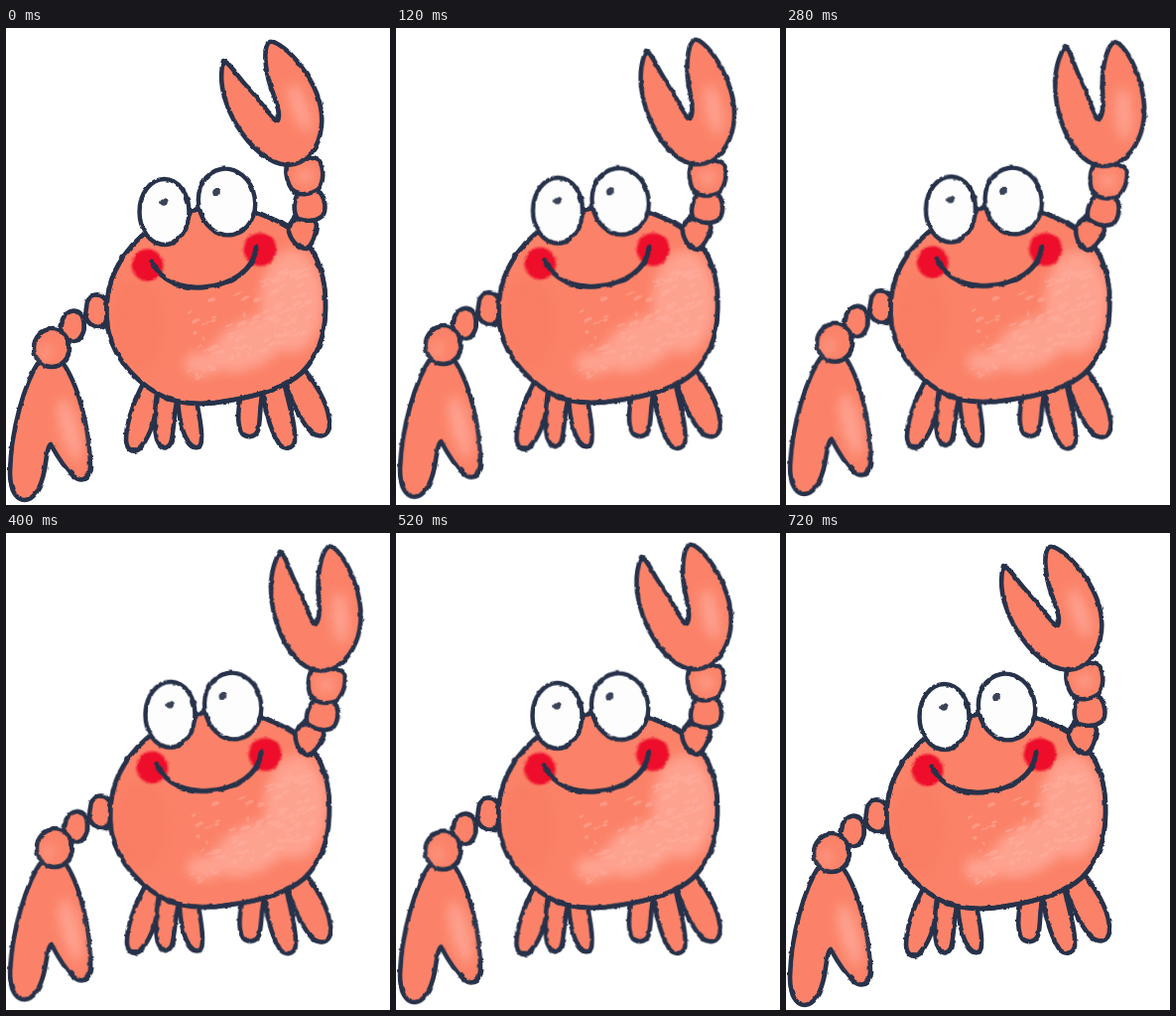
An HTML page for the animation above (760 ms loop, 387x480 px).

```html
<!DOCTYPE html>
<html lang="en">
<head>
<meta charset="utf-8">
<title>Waving crab</title>
<style>
  html, body { margin: 0; height: 100%; overflow: hidden; background: #fff; }
  svg { display: block; width: 100vw; height: 100vh; }
  .shell { fill: #fb8268; stroke: #27324a; stroke-width: 4.6; stroke-linejoin: round; }
  .line { fill: none; stroke: #27324a; stroke-width: 5; stroke-linecap: round; }
  .eye { fill: #fdfdfe; stroke: #27324a; stroke-width: 4.4; }
  .ink { fill: #27324a; }
  .pupil { fill: #3a4358; }
  .cheek { fill: #ee0c2c; filter: url(#smudge); }
  .light { fill: #ffb0a2; }
  .dark { fill: #f87c62; }
  .wash { filter: url(#soft); opacity: .7; }
</style>
</head>
<body>
<svg viewBox="0 0 387 480">
  <defs>
    <filter id="soft" x="-50%" y="-50%" width="200%" height="200%"><feGaussianBlur stdDeviation="6"/></filter>
    <filter id="smudge" x="-30%" y="-30%" width="160%" height="160%"><feGaussianBlur stdDeviation="1.3"/></filter>
    <filter id="wobble" filterUnits="userSpaceOnUse" x="-10" y="-10" width="410" height="500" color-interpolation-filters="sRGB">
      <feTurbulence type="fractalNoise" baseFrequency=".12" numOctaves="2" seed="3"/>
      <feDisplacementMap in="SourceGraphic" scale="3" xChannelSelector="R" yChannelSelector="G"/>
    </filter>
    <path id="shape" d="M190 183 C160 186 128 212 114 237 C102 257 98 284 104 308 C110 334 135 361 163 373 C185 380 205 379 224 375 C250 371 280 363 298 347 C316 329 322 307 322 282 C323 252 314 226 298 211 C285 198 265 190 248 184 C228 178 206 181 190 183Z"/>
    <clipPath id="inside"><use href="#shape"/></clipPath>
  </defs>

  <g id="crab"><g filter="url(#wobble)">
    <g class="shell">
      <path d="M138 358 C127 380 121 398 121 415 C122 427 130 428 136 422 C147 408 152 388 153 366"/>
      <path d="M152 368 C149 390 149 402 152 414 C156 424 162 425 166 418 C170 406 168 391 173 372"/>
      <path d="M173 372 C174 394 178 409 185 418 C190 424 197 424 197 414 C198 402 194 389 192 374"/>
      <path d="M237 368 C233 388 233 401 238 408 C243 413 251 412 254 405 C257 394 255 382 259 364"/>
      <path d="M258 362 C261 387 267 405 275 418 C280 425 289 424 291 416 C292 399 285 378 280 356"/>
      <path d="M280 354 C289 379 298 397 308 407 C315 413 325 411 326 401 C327 382 314 360 298 340"/>
    </g>

    <g class="shell">
      <path d="M34 334 C18 358 5 405 4 447 C4 465 10 475 19 475 C30 474 36 459 39 444 C41 430 42 421 45 419 C50 428 58 442 68 451 C76 458 84 454 85 442 C85 416 77 366 58 338Z"/>
      <path d="M57 293 C62 283 72 282 77 290 C80 299 79 308 73 314 C66 317 58 312 55 304Z"/>
      <path d="M82 275 C87 266 97 266 102 276 C103 286 102 295 98 300 C90 303 81 298 80 288Z"/>
      <ellipse cx="46" cy="322" rx="18" ry="19"/>
    </g>
    <g class="light wash">
      <ellipse cx="64" cy="404" rx="9" ry="32" transform="rotate(-15 64 404)"/>
      <ellipse cx="40" cy="326" rx="5" ry="7"/>
    </g>

    <use href="#shape" class="shell"/>
    <g clip-path="url(#inside)">
      <g class="wash">
        <ellipse class="dark" cx="132" cy="298" rx="26" ry="45"/>
        <ellipse class="light" cx="288" cy="275" rx="32" ry="52"/>
        <ellipse class="light" cx="245" cy="318" rx="42" ry="24" transform="rotate(-25 245 318)"/>
        <ellipse class="light" cx="197" cy="338" rx="18" ry="12"/>
      </g>
      <g id="flecks" class="light" opacity=".5"></g>
    </g>
    <use href="#shape" class="shell" style="fill:none"/>

    <circle class="cheek" cx="142.500" cy="238.500" r="16"/>
    <circle class="cheek" cx="256" cy="223" r="16.500"/>
    <path class="line" d="M147 235 C157 257 180 262 198 261 C228 259 250 243 252 221"/>

    <ellipse class="eye" cx="159.500" cy="185" rx="25" ry="33"/>
    <ellipse class="eye" cx="222.500" cy="175" rx="28.500" ry="33.500" transform="rotate(-10 222.500 175)"/>
    <circle class="pupil" cx="159" cy="175" r="3.800"/>
    <circle class="pupil" cx="212" cy="165.500" r="3.800"/>
  </g>

    <g id="arm"><g filter="url(#wobble)">
      <g class="shell">
        <path d="M285 205 C286 195 291 188 298 188 C305 189 311 192 313 198 C312 209 309 218 303 222 C296 222 288 216 285 205Z"/>
        <path d="M294 167 C301 163 312 162 317 166 C322 173 323 183 319 189 C312 195 302 195 294 192 C289 185 290 174 294 167Z"/>
        <path d="M283 138 C291 130 308 128 316 134 C321 142 320 155 315 162 C307 168 295 169 289 164 C284 157 281 147 283 138Z"/>
        <path d="M219 33 C214 53 220 76 232 97 C246 120 265 137 284 138 C303 137 316 121 318 98 C320 76 310 55 297 38 C286 23 271 12 265 14 C259 20 261 42 267 60 C273 75 277 87 274 93 C268 92 257 74 245 61 C234 50 225 34 219 33Z"/>
      </g>
      <g class="light wash" opacity=".6">
        <ellipse cx="296" cy="80" rx="8" ry="26" transform="rotate(-20 296 80)"/>
        <ellipse cx="301" cy="149" rx="8" ry="7"/>
      </g>
    </g></g>
  </g>
</svg>
<script>
  const FRAME = 40, LOOP = 760;
  // Wave amount: [step, amount], with one padding key at each end
  const keys = [[-1, -.2], [0, 0], [3, .54], [7, 1], [8.2, 1.08], [10, .92],
                [12, .6], [15, .227], [18, 0], [19, 0]];
  const crab = document.getElementById('crab');
  const arm = document.getElementById('arm');
  const flecks = document.getElementById('flecks');

  const slope = i => (keys[i + 1][1] - keys[i - 1][1]) / (keys[i + 1][0] - keys[i - 1][0]);

  function waveAt(step) {
    if (step >= 18) return 0;
    let i = 1;
    while (keys[i + 1][0] <= step) i++;
    const [x0, y0] = keys[i], [x1, y1] = keys[i + 1];
    const w = x1 - x0, u = (step - x0) / w, v = 1 - u;
    return v * v * ((1 + 2 * u) * y0 + u * w * slope(i))
         + u * u * ((3 - 2 * u) * y1 - v * w * slope(i + 1));
  }

  let seed = 7;
  const random = () => (seed = seed * 16807 % 2147483647) / 2147483647;

  // Dry-brush flecks on the lower right of the shell
  for (let i = 0; i < 110; i++) {
    const x = 185 + random() * 120, y = 355 - random() * 75 - (x - 185) * .4;
    const fleck = document.createElementNS(flecks.namespaceURI, 'ellipse');
    const attrs = { cx: x, cy: y, rx: 1 + random() * 5, ry: .8 + random() * 1.6,
                    transform: `rotate(-25 ${x} ${y})` };
    for (const name in attrs) fleck.setAttribute(name, attrs[name]);
    flecks.append(fleck);
  }

  function draw(now) {
    const wave = waveAt(Math.floor(now % LOOP / FRAME));
    crab.setAttribute('transform', `translate(0 ${-1.2 * wave}) rotate(${1.4 * wave} 215 450)`);
    arm.setAttribute('transform', `rotate(${16.2 * wave} 298 207)`);
    requestAnimationFrame(draw);
  }
  draw(0);
</script>
</body>
</html>
```
